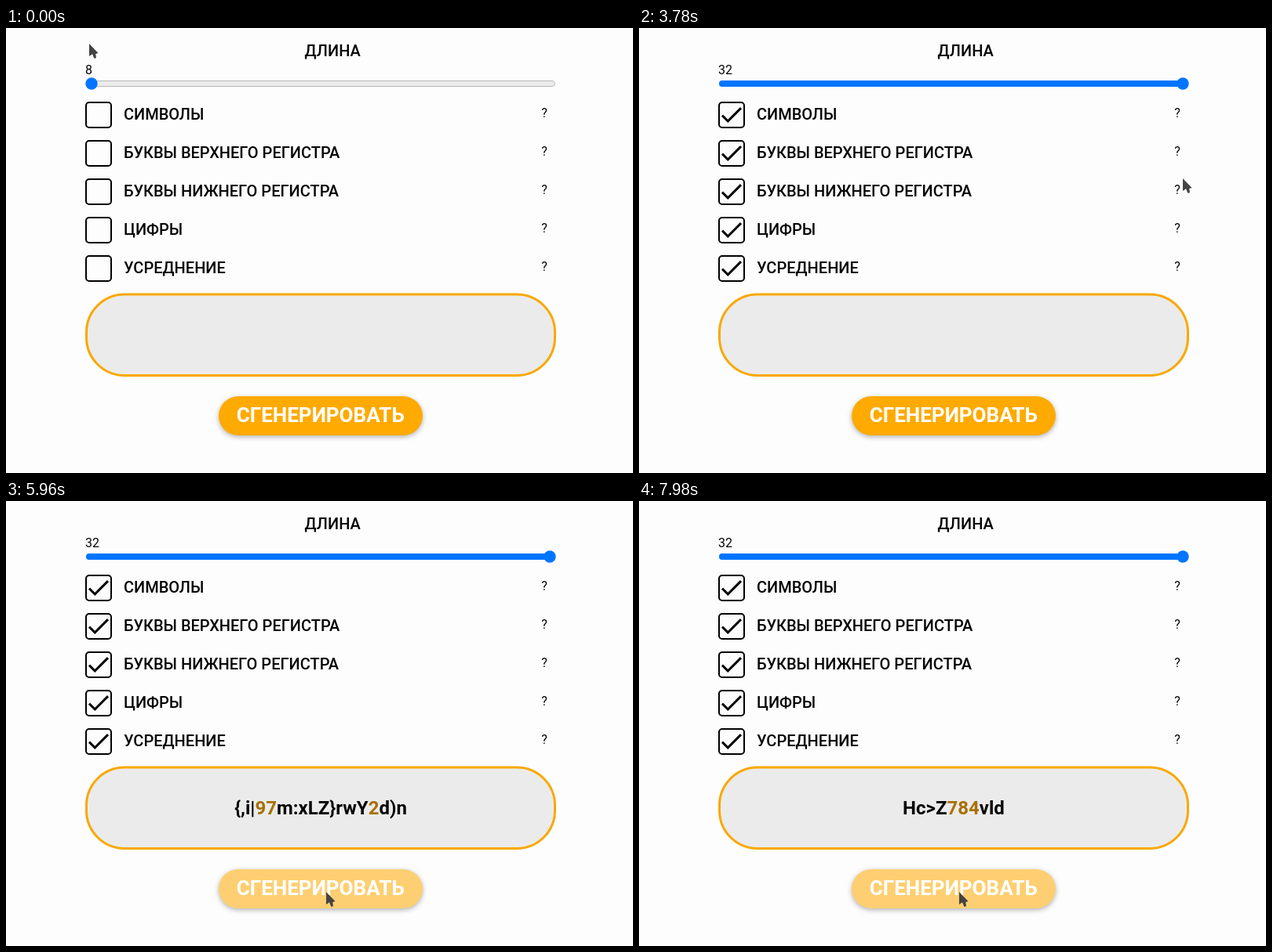
An HTML page that plays this animation: 799 px wide and 568 px high, repeating every 8 s.

```html
<!DOCTYPE html>
<html lang="ru">
<head>
<meta charset="utf-8">
<title>Генератор паролей</title>
<style>
  html, body { margin: 0; width: 100%; height: 100%; overflow: hidden; background: #fdfdfd; }
  svg { display: block; width: 799px; height: 568px; }
  text { font-family: Roboto, "Open Sans", sans-serif; fill: #050505; }
  .label { font-size: 20px; font-weight: 500; }
  .small { font-size: 16px; }
  .password { font-size: 24px; font-weight: 700; text-anchor: middle; }
  .password .digit { fill: #a87000; }
  .caption { font-size: 26px; font-weight: 700; text-anchor: middle; fill: #fff; }
  .box { stroke: #000; stroke-width: 2; }
  .tick { fill: #050505; }
  #button { filter: drop-shadow(0 2px 3px rgba(0, 0, 0, .3)); }
</style>
</head>
<body>
<svg id="stage" viewBox="0 0 799 568">
  <text class="label" x="380.6" y="36">ДЛИНА</text>
  <text class="small" id="value" x="101" y="59">8</text>
  <rect x="102.5" y="67.5" width="597" height="7" rx="3.5" fill="#ebebeb" stroke="#b8b8b8"/>
  <rect id="fill" x="102" y="67" height="8" rx="4" fill="#0075ff"/>
  <circle id="thumb" cy="71" r="7.7" fill="#0075ff"/>
  <g id="rows"></g>
  <rect x="102.5" y="340" width="597" height="103.5" rx="48.5" fill="#ebebeb" stroke="#f9a800" stroke-width="3"/>
  <text class="password" id="password" x="401" y="400"></text>
  <rect id="button" x="271" y="470" width="260" height="50" rx="25"/>
  <text class="caption" x="400.7" y="503">СГЕНЕРИРОВАТЬ</text>
  <path id="cursor" fill="#444" d="M0 0V16L4 13.2L6.5 19L9 18L8.2 13L11.5 12Z"/>
</svg>
<script>
const LOOP = 8000, STEP = 20;
const labels = ['СИМВОЛЫ', 'БУКВЫ ВЕРХНЕГО РЕГИСТРА', 'БУКВЫ НИЖНЕГО РЕГИСТРА', 'ЦИФРЫ', 'УСРЕДНЕНИЕ'];
const checkTimes = [980, 1240, 1440, 1560, 1740];

// time, x, y
const cursorPath = [
  [0, 106, 20], [300, 106, 24], [840, 108, 87], [920, 114, 102], [1040, 116, 108],
  [1140, 117, 148], [1340, 118, 162], [1360, 118, 170], [1380, 118, 192], [1440, 118, 204],
  [1540, 118, 252], [1640, 118, 299], [1860, 117, 306], [2460, 110, 96], [2560, 109, 68],
  [2680, 109, 68], [3280, 698, 46], [3440, 787, 37], [3520, 787, 40], [3780, 693, 192],
  [4080, 553, 506], [4120, 546, 507], [4300, 409, 499], [5400, 409, 499], [5420, 408, 499],
  [LOOP, 408, 499]
];
const dragStart = 2640, dragEnd = 3480;

const passwords = [
  { start: 4460, text: '{,i|97m:xLZ}rwY2d)D5t^566NG4w<@Q' },
  { start: 7220, text: 'Hc>Z784vlK' }
];
const charDelay = 80, settleTime = 100;
const shuffle = 'kT7q&Bx3nRv%hW0sJ!f9GzdP+yeal';

const white = [253, 253, 253], orange = [255, 170, 0], amber = [253, 207, 114];

const $ = id => document.getElementById(id);
const clamp = (v, lo, hi) => Math.min(hi, Math.max(lo, v));
const mix = (a, b, k) => 'rgb(' + a.map((v, i) => Math.round(v + (b[i] - v) * k)) + ')';

function add(parent, tag, attrs, content = '') {
  const node = document.createElementNS('http://www.w3.org/2000/svg', tag);
  for (const key in attrs) node.setAttribute(key, attrs[key]);
  node.textContent = content;
  return parent.appendChild(node);
}

const rows = labels.map((label, i) => {
  const g = add($('rows'), 'g', { transform: `translate(0 ${94 + 49 * i})` });
  const box = add(g, 'rect', { class: 'box', x: 102, y: 1, width: 32, height: 32, rx: 4 });
  const tick = add(g, 'path', {
    class: 'tick',
    transform: 'translate(118 17) scale(1.48) translate(-12.2 -12.3)',
    d: 'M9 16.2L4.8 12L3.4 13.4L9 19L21 7L19.6 5.6Z'
  });
  add(g, 'text', { class: 'label', x: 150, y: 23 }, label);
  const halo = add(g, 'circle', { cx: 686, cy: 15, r: 15, fill: mix(amber, amber, 0) });
  add(g, 'text', { class: 'small', x: 686, y: 20, 'text-anchor': 'middle' }, '?');
  return { box, tick, halo };
});

function cursorAt(t) {
  const next = Math.max(1, cursorPath.findIndex(p => p[0] >= t));
  const [t0, x0, y0] = cursorPath[next - 1], [t1, x1, y1] = cursorPath[next];
  const k = clamp((t - t0) / (t1 - t0), 0, 1);
  return [x0 + (x1 - x0) * k, y0 + (y1 - y0) * k];
}

// Share of the recent past spent inside an area, which acts as a linear fade.
function hover(t, left, top, width, height) {
  let inside = 0;
  for (let k = 0; k < 8; k++) {
    const [x, y] = cursorAt(Math.max(0, t - k * STEP));
    if (x >= left && x <= left + width && y > top && y < top + height) inside++;
  }
  return inside / 8;
}

function passwordAt(t) {
  const current = passwords.filter(p => t >= p.start).pop();
  if (!current) return '';
  const age = t - current.start;
  const count = Math.min(current.text.length, Math.floor(age / charDelay) + 1);
  return [...current.text.slice(0, count)].map((char, i) =>
    age - i * charDelay >= settleTime ? char : shuffle[(t / STEP + count - 1 - i) % shuffle.length]
  ).join('');
}

let shown = '';
function showPassword(text) {
  if (text === shown) return;
  shown = text;
  $('password').replaceChildren();
  for (const part of text.match(/\d+|\D+/g) || [])
    add($('password'), 'tspan', { class: /\d/.test(part) ? 'digit' : 'plain' }, part);
}

function draw(t) {
  const [x, y] = cursorAt(t);
  $('cursor').setAttribute('transform', `translate(${Math.round(x)} ${Math.round(y)})`);

  const dragX = t < dragStart ? 109 : t > dragEnd ? 693 : clamp(x, 109, 693);
  const notch = Math.round((dragX - 109) / 584 * 24);
  const thumbX = 109 + notch * 584 / 24;
  $('value').textContent = 8 + notch;
  $('thumb').setAttribute('cx', thumbX);
  $('fill').setAttribute('width', thumbX - 102);

  rows.forEach(({ box, tick, halo }, i) => {
    const level = hover(t, 101, 94 + 49 * i, 600, 34);
    box.setAttribute('fill', mix(white, amber, level));
    halo.setAttribute('opacity', level);
    tick.setAttribute('visibility', t >= checkTimes[i] ? 'visible' : 'hidden');
  });

  $('button').setAttribute('fill', mix(orange, amber, hover(t, 271, 470, 260, 50)));
  showPassword(passwordAt(t));
}

let origin;
function tick(now) {
  origin ??= now;
  draw(Math.floor(((now - origin + 1) % LOOP) / STEP) * STEP);
  requestAnimationFrame(tick);
}
draw(0);
requestAnimationFrame(tick);
</script>
</body>
</html>
```
